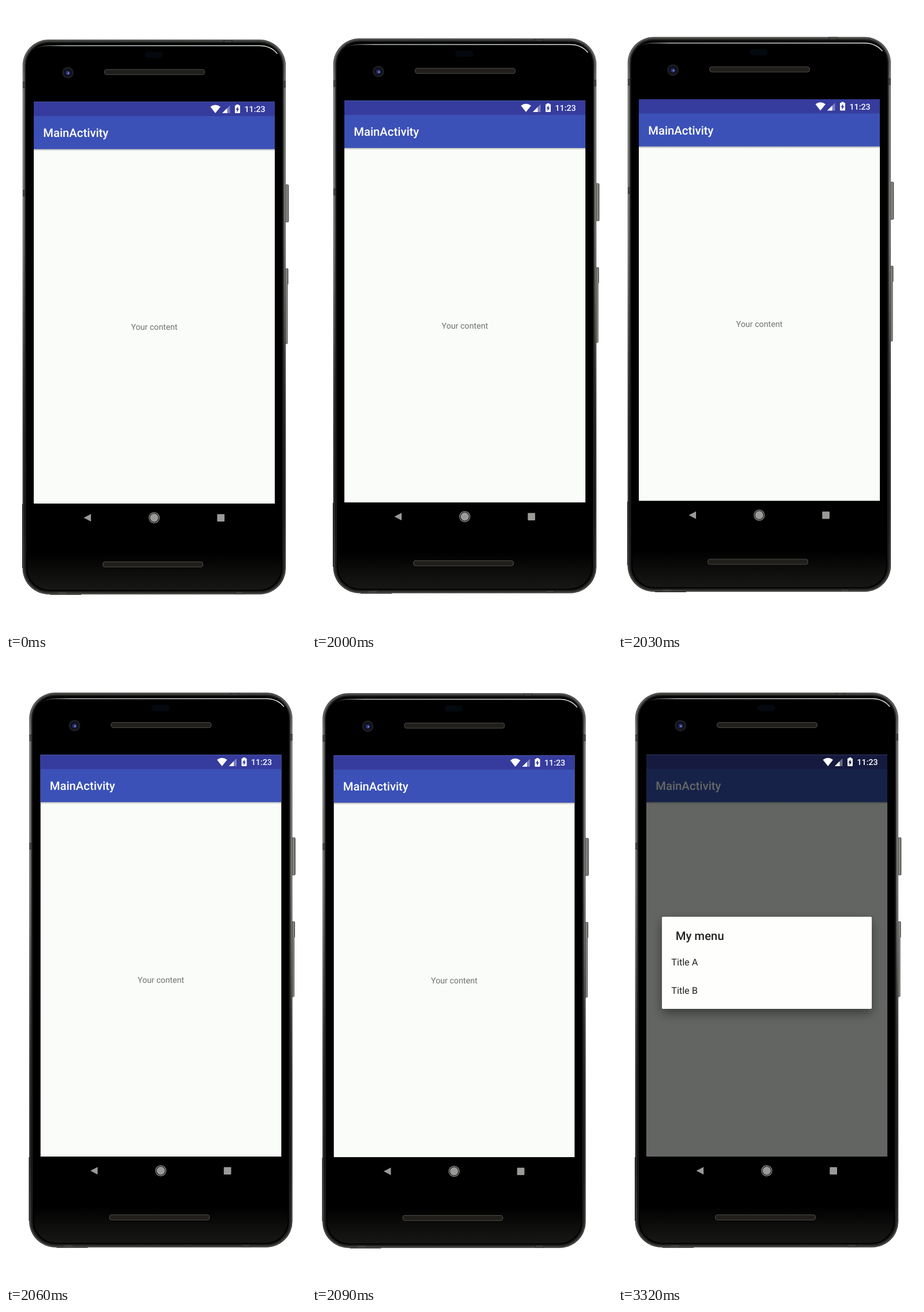
An HTML page for the animation above (4120 ms loop, 519 by 1079 pixels).

```html
<!DOCTYPE html>
<html lang="en">
<head>
<meta charset="utf-8">
<title>Shake to open menu</title>
<style>
  html, body { margin: 0; width: 100%; height: 100%; overflow: hidden; background: #fff; }
  svg { display: block; width: 519px; height: 1079px; font-family: Roboto, sans-serif; text-rendering: geometricPrecision; }
  .medium { font-weight: 500; }
  .title { font-size: 20.27px; }
  .item { font-size: 16.2px; }
  .small { font-size: 14.2px; }
</style>
</head>
<body>
<svg viewBox="0 0 519 1079">
  <defs>
    <linearGradient id="metal" x2="0" y2="1">
      <stop stop-color="#3a3c39"/>
      <stop offset=".08" stop-color="#5d5f5c"/>
      <stop offset=".35" stop-color="#5a5c59"/>
      <stop offset=".6" stop-color="#2a2c29"/>
      <stop offset=".85" stop-color="#131412"/>
      <stop offset="1" stop-color="#2b2d2a"/>
    </linearGradient>
    <linearGradient id="shine" x2="0" y2="1">
      <stop stop-color="#5f615e"/>
      <stop offset=".1" stop-color="#8a8c89"/>
      <stop offset=".4" stop-color="#80827f"/>
      <stop offset=".7" stop-color="#3a3c39"/>
      <stop offset="1" stop-color="#50524e"/>
    </linearGradient>
    <linearGradient id="chin" x2="0" y2="1">
      <stop stop-color="#000"/>
      <stop offset=".7" stop-color="#111210"/>
      <stop offset="1" stop-color="#171815"/>
    </linearGradient>
    <linearGradient id="glint">
      <stop stop-color="#b8bebb" stop-opacity="0"/>
      <stop offset=".12" stop-color="#b8bebb"/>
      <stop offset="1" stop-color="#e4e9e6"/>
    </linearGradient>
    <linearGradient id="button">
      <stop stop-color="#3c3e3b"/>
      <stop offset=".55" stop-color="#969894"/>
      <stop offset="1" stop-color="#444643"/>
    </linearGradient>
    <linearGradient id="barShadow" x2="0" y2="1">
      <stop stop-color="#000" stop-opacity=".3"/>
      <stop offset="1" stop-color="#000" stop-opacity="0"/>
    </linearGradient>
    <filter id="dialogShadow" x="-20%" y="-20%" width="140%" height="150%">
      <feDropShadow dx="0" dy="8" stdDeviation="9" flood-opacity=".4"/>
    </filter>
    <clipPath id="screen"><path d="M48 165.500h417V859H48z"/></clipPath>
  </defs>

  <g id="phone">
    <!-- Side buttons -->
    <g fill="url(#button)" stroke="#3a3c39" stroke-width=".8">
      <rect x="483" y="308.400" width="5.800" height="64.500" rx="1.500"/>
      <path d="M483 453.500h4q1 0 1 1V480l-1 1v101q0 1-1 1h-3z"/>
    </g>

    <!-- Body: concentric metal bands around the glass -->
    <path fill="#191a18" d="M28 860h3v110h-3zM76 1012h54v4.500H76z"/>
    <rect x="28.700" y="58" width="455.300" height="957.700" rx="45" fill="url(#metal)"/>
    <rect x="30.200" y="59.500" width="452.300" height="954.700" rx="43.500" fill="none" stroke="url(#shine)" stroke-width="1.200"/>
    <path fill="#444643" d="M29 131h6v10h-6zM29 318h6v10h-6zM478 130h6v10h-6zM377 58h14v4h-14zM90 1012h14v3.500h-14zM397 1012h14v3.500h-14z"/>
    <path fill="none" stroke="#222" stroke-width=".8" d="M29 131h6m-6 10h6m-6 177h6m-6 10h6M478 130h6m-6 10h6M377 58v4m14-4v4M397 1012v3m14-3v3"/>
    <rect x="33.700" y="63" width="445.300" height="947.700" rx="40" fill="#000" stroke="#1b1c1a" stroke-width="2"/>
    <path fill="url(#chin)" d="M37 945H476V970A38 38 0 0 1 438 1008H75A38 38 0 0 1 37 970z"/>
    <path fill="none" stroke="url(#glint)" stroke-width="1.400" stroke-linecap="round" d="M50 74Q60 68.500 74 68.500H438Q458 68.500 469 82"/>

    <!-- Camera, sensor and speakers -->
    <circle cx="107" cy="115" r="10" fill="#1c1d20"/>
    <circle cx="107" cy="115" r="6.800" fill="#0d0e1a"/>
    <circle cx="107" cy="115.500" r="4" fill="#272c68"/>
    <circle cx="108" cy="116" r="1.400" fill="#8d9ad8"/>
    <rect x="240" y="79" width="31" height="11" rx="5" fill="#03090e"/>
    <g fill="#211f1c" stroke="#4b4843" stroke-width="1.200">
      <rect x="170.500" y="109.500" width="173" height="9" rx="4"/>
      <rect x="167.500" y="959.500" width="173" height="9" rx="4"/>
    </g>

    <!-- App -->
    <g clip-path="url(#screen)">
      <path fill="#f9fcf9" d="M48 165h417v694H48z"/>
      <path fill="#3b51b7" d="M48 165h417v82H48z"/>
      <path fill="#363c9d" d="M48 165h417v25H48z"/>
      <path fill="url(#barShadow)" d="M48 247h417v3.500H48z"/>
      <text class="medium title" x="64.200" y="226" fill="#fff">MainActivity</text>
      <text class="small" x="256.500" y="558.500" text-anchor="middle" fill="#707270">Your content</text>
      <path class="menu" fill="#000401" fill-opacity=".605" d="M48 165h417v694H48z"/>
      <g class="menu">
        <rect x="75" y="445" width="363" height="159" rx="2" fill="#fefffd" filter="url(#dialogShadow)"/>
        <g fill="#202120">
          <text class="medium title" x="98.700" y="485">My menu</text>
          <text class="item" x="91.300" y="529">Title A</text>
          <text class="item" x="91.300" y="577.500">Title B</text>
        </g>
      </g>
    </g>

    <!-- Status icons -->
    <g fill="#fff">
      <path d="M353.500 174Q362 167.500 371 174L362.200 185z"/>
      <path fill-opacity=".35" d="M387.500 171.500V185H374z"/>
      <path d="M382.500 176.500V185H374z"/>
      <path d="M398.500 170h4v1.500h1.500q1 0 1 1V184q0 1-1 1h-7q-1 0-1-1v-11.500q0-1 1-1h1.500z"/>
      <path class="bolt" fill="#363c9d" d="M401.300 173.500v4h2l-3.800 6v-4.500h-2z"/>
      <text class="medium small" x="412.500" y="183.200">11:23</text>
    </g>

    <!-- Navigation -->
    <g fill="#999b98">
      <path d="M134.500 883.500L147 877v13z"/>
      <circle cx="256.300" cy="883.500" r="7.200"/>
      <circle cx="256.300" cy="883.500" r="8.900" fill="none" stroke="#999b98" stroke-width="1.200"/>
      <rect x="365.300" y="877.200" width="12.700" height="12.700" rx=".8"/>
    </g>
  </g>
</svg>
<script>
  const REST = 2000, STEP = 30, LOOP = 4120;
  const poses = [[0, 0], [8, -2], [-12, -4.5], [11.5, 0], [-10.5, 1], [1, 0]];
  const last = poses.length - 1;
  const phone = document.getElementById("phone");
  const menu = document.querySelectorAll(".menu");
  const bolt = document.querySelector(".bolt");

  function draw(now) {
    const t = now % LOOP;
    const pose = t < REST ? 0 : Math.min(last, 1 + Math.floor((t - REST) / STEP));
    const open = pose === last;
    phone.setAttribute("transform", `translate(${poses[pose]})`);
    menu.forEach(part => part.style.display = open ? "" : "none");
    bolt.setAttribute("fill", open ? "#16183f" : "#363c9d");
  }

  const start = performance.now();
  function tick() {
    draw(performance.now() - start);
    requestAnimationFrame(tick);
  }
  tick();
</script>
</body>
</html>
```
